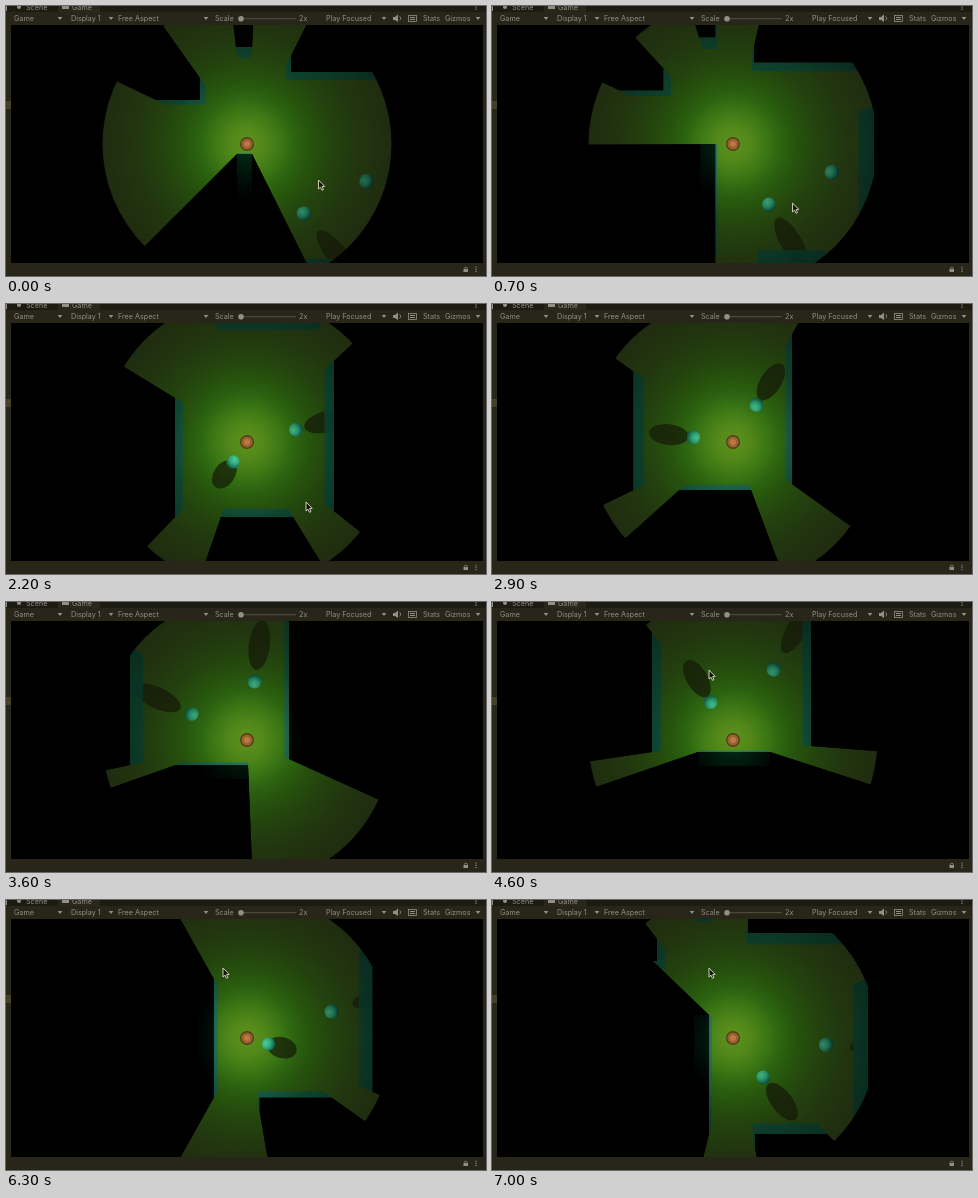
These frames come from a looping animation (480x270 px, 7100 ms). An HTML page with a canvas:

```html
<!DOCTYPE html>
<html lang="en">
<head>
<meta charset="utf-8">
<title>Line of sight</title>
<style>
html, body { margin: 0; width: 100%; height: 100%; overflow: hidden; background: #000; }
canvas { display: block; width: 480px; height: 270px; }
</style>
</head>
<body>
<canvas id="stage" width="480" height="270"></canvas>
<script>
const ctx = document.getElementById('stage').getContext('2d');
const LOOP = 7100, STEP = 100;
const CX = 241, CY = 138, REACH = 144.5;
const GROUND = 0.89; // floor scale relative to the wall tops
const BALL = 0.92;

// time, map x, map y
const path = [
  [0, 77, 54], [1300, 34, 33], [2200, 0, 0], [3600, -45, -50],
  [4600, -9, -63], [5700, 28, -42], [7000, 48, 21]
];
// left, top, right, bottom of each wall top
const walls = [
  [154, 94, 169, 213], [328, 57, 342, 207], [215, 213, 287, 227],
  [208, -4, 319, 12], [153, -60, 169, -13], [73, 18, 117, 40]
];
const balls = [[227, 158], [290, 125.5]];

// Cubic Hermite through the path points
function mapOffset(t) {
  let i = 0;
  while (i < path.length - 2 && t > path[i + 1][0]) i++;
  const a = path[i], b = path[i + 1], span = b[0] - a[0];
  const u = (t - a[0]) / span;
  const slope = (n, k) => {
    const p = path[Math.max(0, n - 1)], q = path[Math.min(path.length - 1, n + 1)];
    return (q[k] - p[k]) / (q[0] - p[0]) * span;
  };
  return [1, 2].map(k => {
    const m = slope(i, k), n = slope(i + 1, k), d = b[k] - a[k];
    return a[k] + m * u + (3 * d - 2 * m - n) * u * u + (m + n - 2 * d) * u * u * u;
  });
}

function radial(x, y, r, stops) {
  const g = ctx.createRadialGradient(x, y, 0, x, y, r);
  stops.forEach(([at, color]) => g.addColorStop(at, color));
  return g;
}

function poly(points, fill) {
  ctx.fillStyle = fill;
  ctx.beginPath();
  points.forEach(([x, y]) => ctx.lineTo(x, y));
  ctx.closePath();
  ctx.fill();
}

function disc(x, y, r, fill) {
  ctx.fillStyle = fill;
  ctx.beginPath();
  ctx.arc(x, y, r, 0, Math.PI * 2);
  ctx.fill();
}

function rect(x, y, w, h, fill) {
  ctx.fillStyle = fill;
  ctx.fillRect(x, y, w, h);
}

// Scale every edge of a box about the viewer and fill the swept area
function extrude(box, k, fill) {
  const far = ([x, y]) => [CX + (x - CX) * k, CY + (y - CY) * k];
  box.forEach((p, i) => {
    const q = box[(i + 1) % 4];
    poly([p, q, far(q), far(p)], fill);
  });
}

const light = radial(CX, CY, REACH, [
  [0, '#5f921c'], [0.12, '#52881a'], [0.24, '#3a7614'], [0.33, '#2c6410'],
  [0.45, '#26520d'], [0.6, '#23420e'], [0.78, '#21350f'], [1, '#202c10']
]);
const face = radial(CX, CY, REACH, [
  [0, '#288074'], [0.3, '#1a5f56'], [0.55, '#0a4233'], [1, '#062c22']
]);
const topGlow = radial(CX, CY, 60, [
  [0, 'rgba(0,75,40,.75)'], [0.45, 'rgba(0,45,24,.5)'], [1, 'rgba(0,20,10,0)']
]);

function ballShadow([x, y]) {
  const dx = x - CX, dy = y - CY, d = Math.hypot(dx, dy);
  ctx.fillStyle = 'rgba(22,26,8,.72)';
  ctx.beginPath();
  ctx.ellipse(CX + dx * 1.62, CY + dy * 1.62, 9 + 0.27 * d, 10.5,
    Math.atan2(dy, dx), 0, Math.PI * 2);
  ctx.fill();
}

function ball([x, y]) {
  const dx = x - CX, dy = y - CY, d = Math.hypot(dx, dy);
  const dim = Math.max(0.55, 1.15 - d / 200);
  const tone = (r, g, b) => `rgb(${r * dim},${g * dim},${b * dim})`;
  const g = radial(x - dx / d * 3, y - dy / d * 3, 10,
    [[0, tone(75, 200, 145)], [0.5, tone(45, 160, 115)], [1, tone(10, 75, 60)]]);
  disc(x, y, 6.5 + d / 130, g);
}

function player() {
  disc(CX, CY, 7, '#50401a');
  disc(CX, CY, 5.6, '#9a6030');
  disc(CX, CY, 3, '#bc7844');
}

function world(t) {
  const [ox, oy] = mapOffset(t);
  const boxes = walls.map(([l, u, r, d]) =>
    [[l, u], [r, u], [r, d], [l, d]].map(([x, y]) => [x + ox, y + oy]));
  const spots = balls.map(([x, y]) => [x + ox * BALL, y + oy * BALL]);

  ctx.save();
  ctx.beginPath();
  ctx.rect(5, 19, 472, 238);
  ctx.clip();
  rect(0, 0, 480, 270, light);
  spots.forEach(ballShadow);
  ctx.globalAlpha = 0.85;
  boxes.forEach(b => extrude(b, GROUND, face));
  ctx.globalAlpha = 1;
  spots.forEach(ball);
  boxes.forEach(b => {
    extrude(b, 40, '#000');
    poly(b, '#000');
  });
  boxes.forEach(b => poly(b, topGlow));

  // darkness beyond the light's reach
  ctx.fillStyle = '#000';
  ctx.beginPath();
  ctx.rect(0, 0, 480, 270);
  ctx.arc(CX, CY, REACH, 0, Math.PI * 2);
  ctx.fill('evenodd');
  player();
  ctx.restore();
}

const INK = '#929084';

function label(text, x, y) {
  ctx.font = '7.2px Inter, Roboto, sans-serif';
  ctx.textBaseline = 'alphabetic';
  ctx.fillStyle = INK;
  ctx.fillText(text, x, y);
}

function arrow(x) {
  poly([[x - 2.3, 11], [x + 2.3, 11], [x, 14]], INK);
}

function menuDots(y) {
  [-2.2, 0, 2.2].forEach(d => disc(470, y + d, 0.7, INK));
}

function chrome() {
  rect(0, 0, 480, 270, '#282619');
  rect(0, 0, 480, 6, '#1d1c13');
  rect(52, 0, 42, 6, '#2a281b');
  rect(0, 95, 5, 8, '#434126');
  rect(0, 0, 1, 5, INK);
  label('Scene', 20, 4);
  label('Game', 66, 4);
  disc(13, 1, 2, INK);
  rect(56, 0, 7, 3, INK);
  menuDots(1);

  label('Game', 8, 15);
  label('Display 1', 65, 15);
  label('Free Aspect', 112, 15);
  label('Scale', 209, 15);
  label('2x', 293, 15);
  label('Play Focused', 320, 15);
  label('Stats', 417, 15);
  label('Gizmos', 439, 15);
  [54, 105, 200, 378, 472].forEach(arrow);
  rect(235, 12.2, 55, 1, '#555340');
  disc(235, 12.7, 2.8, INK);

  // speaker and keyboard
  poly([[387, 11], [389, 11], [392, 8.5], [392, 16], [389, 14], [387, 14]], INK);
  ctx.strokeStyle = INK;
  ctx.lineWidth = 0.8;
  ctx.beginPath();
  ctx.arc(392, 12.3, 2.6, -0.9, 0.9);
  ctx.stroke();
  ctx.strokeRect(402.4, 9.4, 8, 6);
  rect(404, 11, 5, 1, INK);
  rect(404, 13, 5, 1, INK);

  // lock
  rect(457.5, 263, 4.5, 3, INK);
  ctx.beginPath();
  ctx.arc(459.8, 262.8, 1.6, Math.PI, 0);
  ctx.stroke();
  menuDots(263.3);
}

function cursor(t) {
  if (t >= 2900 && t < 4100) return;
  let x = 217, y = 68;
  if (t < 2900) {
    const u = Math.min(1, t / 800), e = u * u * (3 - 2 * u);
    x = 312.5 - 12.5 * e;
    y = 174 + 24 * e;
  }
  const shape = [[0, 0], [0, 9], [2, 7.2], [3.5, 10.3], [5, 9.6], [3.6, 6.6], [6.2, 6.4]];
  poly(shape.map(([a, b]) => [x + a, y + b]), '#14140e');
  ctx.strokeStyle = '#cfccb8';
  ctx.lineWidth = 1;
  ctx.stroke();
}

function frame(now) {
  const t = Math.floor((now % LOOP) / STEP) * STEP;
  chrome();
  world(t);
  cursor(t);
}

const start = performance.now();
function tick() {
  frame(performance.now() - start);
  requestAnimationFrame(tick);
}
tick();
</script>
</body>
</html>
```
